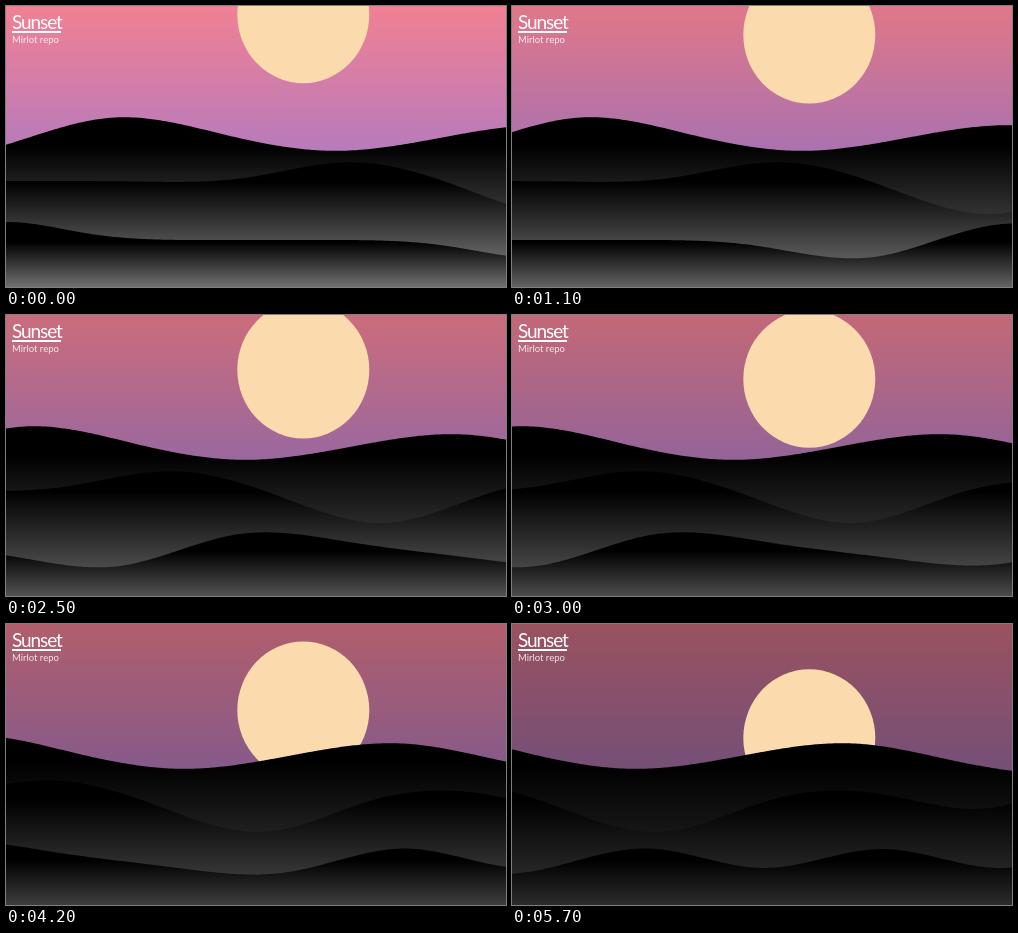
Animation of 500 by 281 pixels, one loop 5.8 s. Source, as an HTML page with a canvas:

```html
<!DOCTYPE html>
<html lang="en">
<head>
<meta charset="utf-8">
<title>Sunset</title>
<style>
  html, body { margin: 0; width: 100%; height: 100%; overflow: hidden; background: #000; }
  canvas { display: block; position: absolute; left: 0; top: 0; }
  div { position: absolute; left: 6px; color: #fff; font-family: Lato, sans-serif; line-height: 1; white-space: nowrap; }
  .title { top: 6px; font-size: 19px; letter-spacing: -1.1px; }
  .line { top: 25px; width: 49px; height: 1.5px; background: #fff; }
  .link { top: 29px; font-size: 9.5px; opacity: .85; }
</style>
</head>
<body>
<canvas width="500" height="281"></canvas>
<div class="title">Sunset</div>
<div class="line"></div>
<div class="link">Mirlot repo</div>
<script>
const W = 500, H = 281, LOOP = 5800, STEP = 100;
const ctx = document.querySelector('canvas').getContext('2d');

// Each ridge is a smooth spline over evenly spaced control heights.
// speed in px/ms; the fill runs from black at `dark` to `grey` at the stage bottom.
const hills = [
  { speed: .036, dark: 140, grey: 118, left: -112, gap: 110,
    knots: [165, 143, 99, 130, 152, 131, 111, 142, 155] },
  { speed: .0725, dark: 176, grey: 140, left: -86, gap: 108,
    knots: [175, 175, 175, 178, 145, 179, 225, 168, 162, 200, 145] },
  { speed: .1775, dark: 236, grey: 112, left: -152, gap: 118,
    knots: [300, 197, 234, 234, 234, 234, 267, 205, 230, 242, 260, 206, 263, 206, 263, 206] }
];

// uniform cubic B-spline
function heightAt({ left, gap, knots }, x) {
  const s = (x - left) / gap, i = Math.floor(s), u = s - i, v = 1 - u;
  const knot = k => knots[Math.max(0, Math.min(knots.length - 1, i + k))];
  return (v ** 3 * knot(-1) + (3 * u ** 3 - 6 * u * u + 4) * knot(0)
    + (3 * v ** 3 - 6 * v * v + 4) * knot(1) + u ** 3 * knot(2)) / 6;
}

function gradient(y0, y1, top, bottom, light) {
  const g = ctx.createLinearGradient(0, y0, 0, y1);
  [top, bottom].forEach((c, i) => g.addColorStop(i, `rgb(${c.map(v => Math.round(v * light))})`));
  return g;
}

function draw(t) {
  const dusk = t / 5700;
  ctx.fillStyle = gradient(0, 145, [241, 128, 147], [183, 123, 188], 1 - .36 * dusk);
  ctx.fillRect(0, 0, W, H);

  ctx.fillStyle = '#fbdaae';
  ctx.beginPath();
  ctx.ellipse(297.3, 8.5 + .0185 * t, 66, 68.7, 0, 0, 2 * Math.PI);
  ctx.fill();

  for (const hill of hills) {
    const { speed, dark, grey } = hill;
    ctx.fillStyle = gradient(dark, H, [0, 0, 0], [grey, grey, grey], 1 - .61 * dusk);
    ctx.beginPath();
    ctx.moveTo(0, H);
    for (let x = 0; x <= W; x += 2) ctx.lineTo(x, heightAt(hill, x + speed * t));
    ctx.lineTo(W, H);
    ctx.fill();
  }
}

const start = performance.now();
function tick() {
  const t = (performance.now() - start) % LOOP;
  draw(Math.floor(t / STEP) * STEP);
  requestAnimationFrame(tick);
}
tick();
</script>
</body>
</html>
```
